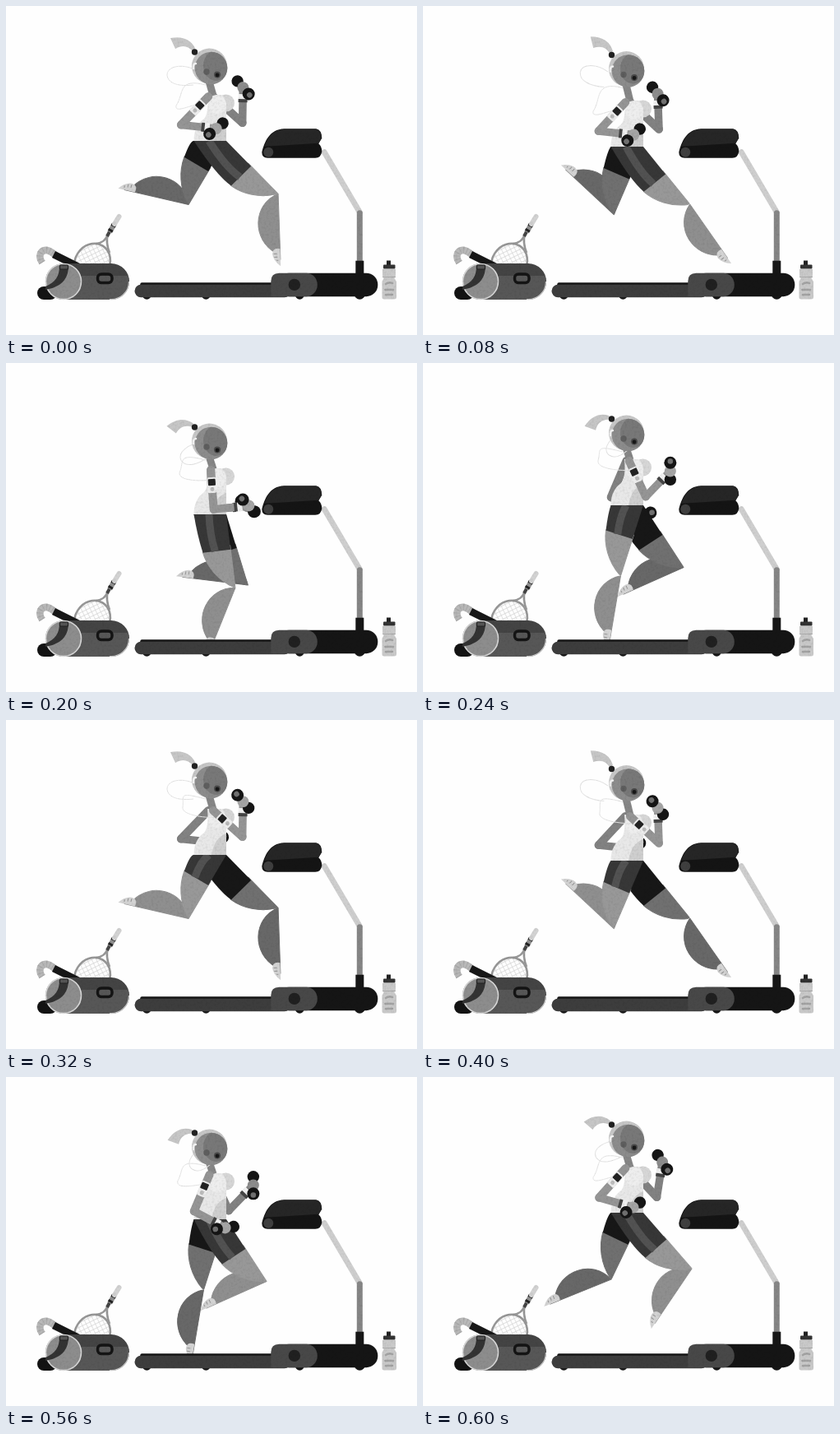
An HTML page for the animation above (0.64 s loop, 500x400 px).

```html
<!DOCTYPE html>
<html lang="en">
<head>
<meta charset="utf-8">
<title>Treadmill run</title>
<style>
  html, body { margin: 0; width: 100%; height: 100%; overflow: hidden; background: #fefefe; }
  svg { display: block; width: 500px; height: 400px; }
  .line { fill: none; }
  .round { stroke-linecap: round; stroke-linejoin: round; }
</style>
</head>
<body>
<svg viewBox="0 0 500 400">
  <defs>
    <filter id="grain" filterUnits="userSpaceOnUse" x="0" y="0" width="500" height="400" color-interpolation-filters="sRGB">
      <feTurbulence type="fractalNoise" baseFrequency=".35" numOctaves="3" seed="4"/>
      <feColorMatrix values="1.6 0 0 0 .1  1.6 0 0 0 .1  1.6 0 0 0 .1  0 0 0 0 .5" result="noise"/>
      <feComposite in="SourceGraphic" in2="noise" operator="arithmetic" k1=".2" k2=".9"/>
    </filter>
    <clipPath id="face"><circle cx="249.500" cy="2.500" r="19.800"/></clipPath>
    <clipPath id="above-belt"><rect width="500" height="340"/></clipPath>
    <pattern id="mesh" width="5" height="5" patternUnits="userSpaceOnUse" patternTransform="rotate(32)">
      <path d="M0 0H5M0 0V5" stroke="#c9c9c9" stroke-width="1.100"/>
    </pattern>
  </defs>

  <g filter="url(#grain)">
    <g id="bag">
      <!-- racket -->
      <ellipse cx="105" cy="312" rx="21" ry="24" transform="rotate(32 105 312)" fill="url(#mesh)" stroke="#979797" stroke-width="2.600"/>
      <path class="line" d="M109 289Q121 288 124 277M126 300Q121 288 124 277" stroke="#979797" stroke-width="2.600"/>
      <path d="M123 280L131 265" stroke="#444" stroke-width="4"/>
      <path d="M126 275L132 265" stroke="#8d8d8d" stroke-width="6"/>
      <path d="M126.500 274L128 271.500M130 268L131.500 265.500" stroke="#222" stroke-width="6"/>
      <path class="round" d="M132 265L137.500 256" stroke="#d2d2d2" stroke-width="6"/>
      <!-- hooked stick -->
      <path class="line" d="M44 312C38 303 43 296 50 297Q55 298 61 304" stroke="#b9b9b9" stroke-width="8.500"/>
      <path class="line" d="M44 312C38 303 43 296 50 297Q55 298 61 304" stroke="#a8a8a8" stroke-width="8.500" stroke-dasharray="1 3"/>
      <path d="M58 302L88 317" stroke="#171717" stroke-width="9"/>
      <!-- duffel -->
      <rect x="48" y="313" width="102" height="44" rx="22" fill="#444"/>
      <path d="M70 328H148.500A22 22 0 0 1 128 357H70Z" fill="#575757"/>
      <path class="line" d="M126 356.500A21.500 21.500 0 0 0 149.500 335" stroke="#c8c8c8" stroke-width="1.200"/>
      <rect x="111.500" y="326" width="17.500" height="10.500" rx="4.500" fill="none" stroke="#141414" stroke-width="3.500"/>
      <rect x="38" y="341" width="24" height="16" rx="8" fill="#131313"/>
      <circle cx="70" cy="335" r="21.500" fill="#8d8d8d" stroke="#d8d8d8" stroke-width="1.600"/>
      <path d="M65 316H76C76 333 66 342 48 345V341C60 336 65 329 65 316Z" fill="#333"/>
      <rect x="65.500" y="315" width="10" height="5" rx="1" fill="#555" stroke="#222" stroke-width="1.200"/>
    </g>

    <g id="bottle">
      <rect x="463" y="309.500" width="5" height="7" fill="#222"/>
      <rect x="459" y="314.500" width="14.500" height="5" rx="1" fill="#333"/>
      <path d="M458 320H474V328L472.500 331L475 335V354Q475 356.500 472 356.500H460Q457.500 356.500 457.500 354V335L459.500 331L458 328Z" fill="#c9c9c9"/>
      <path d="M458 329.500H474" stroke="#a9a9a9"/>
      <path class="round" d="M462 338Q466 335 470 337M461.500 345H471M462 351H470" fill="none" stroke="#a2a2a2" stroke-width="2.600"/>
    </g>

    <g id="runner">
      <g id="far-arm"></g>
      <g clip-path="url(#above-belt)">
        <g id="far-leg"></g>
        <g id="near-leg"></g>
      </g>
      <g id="torso">
        <circle cx="267.500" cy="-46" r="10.500" fill="#d6d6d6"/>
        <path d="M228.500 0C228.500 -14 234 -22 241 -27Q247 -34 245 -56H262Q268 -52 268 -40V0Z" fill="#e8e8e8"/>
        <path d="M250 0C253 -17 260 -23 268 -26V0Z" fill="#cfcfcf"/>
        <circle cx="257" cy="-44" r="11" fill="#eee"/>
      </g>
      <path id="neck" stroke="#868686" stroke-width="9"/>
      <path id="cord" class="line" stroke="#e4e4e4"/>
      <g id="head">
        <g id="tail">
          <path d="M230 -22C225 -32 215 -37 200 -34L206 -21C214 -26 222 -25 228 -17Z" fill="#c6c6c6"/>
          <path class="line" d="M229 4C214 -3 196 0 196 11C197 22 212 25 228 23" stroke="#e4e4e4"/>
        </g>
        <circle cx="247.500" cy="0" r="21.500" fill="#c6c6c6"/>
        <circle cx="249.500" cy="2.500" r="19.800" fill="#8c8c8c"/>
        <ellipse cx="255.500" cy="-.5" rx="15.500" ry="18.500" fill="#787878" clip-path="url(#face)"/>
        <path class="line round" d="M228 3Q227 -3 231 -3" stroke="#f2f2f2" stroke-width="2.400"/>
        <circle cx="244" cy="7" r="3.700" fill="#5e5e5e"/>
        <circle cx="257" cy="10.500" r="4" fill="#4a4a4a"/>
        <circle cx="257" cy="11" r="2.400" fill="#171717"/>
        <circle cx="229.500" cy="-17" r="3.700" fill="#222"/>
      </g>
      <g id="near-arm"></g>
    </g>

    <g id="treadmill" transform="translate(.3 .7)">
      <path d="M387 177L430 250" stroke="#cfcfcf" stroke-width="7" class="round"/>
      <path d="M430 251V312" stroke="#868686" stroke-width="7" class="round"/>
      <rect x="425" y="309" width="10" height="16" fill="#161616"/>
      <path d="M311 177C314 165 320 149 338 148.500H377Q384 150 384 160L380 166.500Q384 170 384 176Q383 184 376 184H318Q311 184 311 177Z" fill="#141414"/>
      <path d="M314 170C318 159 324 150 338 149H377Q383 151 383.500 160L380 166Q350 168 314 170Z" fill="#262626"/>
      <circle cx="319" cy="177" r="6" fill="#3f3f3f"/>
      <g fill="#161616">
        <circle cx="171" cy="350.500" r="5.500"/><circle cx="243" cy="350.500" r="5.500"/>
        <circle cx="357" cy="350.500" r="5.500"/><circle cx="430" cy="349.500" r="6.500"/>
        <rect x="163" y="335.500" width="170" height="6" rx="2"/>
      </g>
      <rect x="156.200" y="338" width="190" height="15.500" rx="7.700" fill="#3d3d3d"/>
      <rect x="330" y="324" width="122" height="28.500" rx="14" fill="#151515"/>
      <path d="M332 324H365A13.500 14.250 0 0 1 365 352.500H322V334Q322 324 332 324Z" fill="#484848"/>
      <circle cx="350.500" cy="338.200" r="7.200" fill="#202020"/>
    </g>
  </g>
</svg>

<script>
const STEP = 40, LOOP = 640, HIP_X = 268;
const THIGH = 90, UPPER_ARM = 48, FOREARM = 43;

// Limb angles in degrees: 0 hangs down, 90 points forward. One value per step.
const swing = {
  thigh: [44.5, 43, 39, 36, 29.7, 7, -17.8, -25.7, -30.6, -29, -23.4, -14, -.6, 17, 33, 41],
  shin: [2, 22, 35, 8, -28, -22, -9.6, -68, -103, -122, -133, -131, -120, -97, -66, -34],
  arm: [-44, -44, -43, -34, -19, 4, 25, 43, 48, 49, 47, 40, 24, 2, -23, -42],
  forearm: [84, 85, 84, 74, 57, 96, 136, 171, 179, 182, 182, 165, 140, 95, 62, 74],
  bell: [141, 138, 137, 150, 172, 225, 270, 237, 229, 229, 231, 252, 270, 220, 172, 145]
};
// The body bounces twice per loop.
const bounce = {
  waist: [164, 166, 171, 182, 194, 184, 173, 165],
  head: [73, 74, 76.5, 90, 104.5, 95, 85, 75],
  tail: [20, 27, 31, 23, 10, -8, -25, -4]
};

const $ = id => document.getElementById(id);
const set = (id, name, value) => $(id).setAttribute(name, value);

function legMarkup(side, skin, calf, shorts) {
  return `
    <g id="${side}-shin" stroke-linejoin="round">
      <path d="M0 0C12 32 55 34 72 5L80 0Z" fill="${calf}" stroke="${calf}"/>
      <path d="M67 0Q65 9 73 9.500Q81 9 88 0Z" fill="#d3d3d3"/>
      <path d="M73 4V8M77 3.500V7.500M81 2.500V5" stroke="#949494"/>
    </g>
    <path id="${side}-thigh" d="M38 0V33L43 34C60 31 78 20 89 2L89 0Z" fill="${skin}" stroke="${skin}" stroke-linejoin="round"/>
    <path id="${side}-shorts" fill="${shorts}"/>
    <path id="${side}-stripe" class="line" stroke="#525252" stroke-width="9"/>`;
}

function armMarkup(side, skin, hand, band) {
  return `
    <path id="${side}-upper" class="round" stroke="${skin}" stroke-width="10"/>
    <path id="${side}-lower" class="round" stroke="${skin}" stroke-width="9.500"/>
    <g id="${side}-wrist">
      <rect x="25" y="-5.500" width="4" height="11" fill="#444"/>
      <rect x="29" y="-5.500" width="6" height="11" fill="#f1f1f1"/>
    </g>
    ${band}
    <g id="${side}-bell">
      <circle cx="-10.300" r="7.200" fill="#151515"/>
      <circle r="7" fill="${hand}"/>
      <circle cx="10.300" r="7.500" fill="#151515"/>
      <circle cx="12" r="3.300" fill="#707070"/>
    </g>`;
}

const armband = `<g id="band">
  <rect x="9" y="-5.500" width="19" height="11" rx="2" fill="#ededed"/>
  <rect x="11" y="-4.500" width="8" height="9" rx="1" fill="#222"/>
  <circle cx="23.500" r="2.500" fill="#bbb"/></g>`;

$('far-leg').innerHTML = legMarkup('far', '#707070', '#686868', '#171717');
$('near-leg').innerHTML = legMarkup('near', '#989898', '#8f8f8f', '#373737');
$('far-arm').innerHTML = armMarkup('far', '#828282', '#8c8c8c', '');
$('near-arm').innerHTML = armMarkup('near', '#959595', '#a5a5a5', armband);
$('far-stripe').remove();

// Local frame of a limb: u runs along it, v points to its back.
function limb(origin, degrees) {
  const a = degrees * Math.PI / 180, s = Math.sin(a), c = Math.cos(a);
  return {
    at: (u, v = 0) => [origin[0] + u * s - v * c, origin[1] + u * c + v * s],
    matrix: `matrix(${s} ${c} ${-c} ${s} ${origin})`
  };
}

function poseLeg(side, i, waist) {
  const thigh = limb([HIP_X, waist], swing.thigh[i]);
  const shin = limb(thigh.at(THIGH), swing.shin[i]);
  set(side + '-thigh', 'transform', thigh.matrix);
  set(side + '-shin', 'transform', shin.matrix);
  set(side + '-shorts', 'd',
    `M228.500 ${waist}H${HIP_X}L${thigh.at(43)}L${thigh.at(43, 34)}Q${thigh.at(22, 38)} 228.500 ${waist}Z`);
  if (side === 'near')
    set('near-stripe', 'd', `M247 ${waist}Q${thigh.at(22, 23)} ${thigh.at(43, 19)}`);
}

function poseArm(side, i, waist) {
  const twist = 4 * Math.sin(swing.arm[i] * Math.PI / 180);
  const shoulder = [249 + twist, waist - 54];
  const upper = limb(shoulder, swing.arm[i]);
  const elbow = upper.at(UPPER_ARM);
  const lower = limb(elbow, swing.forearm[i]);
  const turn = swing.bell[i] + (side === 'far' ? 180 : 0);
  set(side + '-upper', 'd', `M${shoulder}L${elbow}`);
  set(side + '-lower', 'd', `M${elbow}L${lower.at(FOREARM - 4)}`);
  set(side + '-wrist', 'transform', lower.matrix);
  set(side + '-bell', 'transform', `translate(${lower.at(FOREARM)}) rotate(${turn})`);
  if (side === 'near') set('band', 'transform', upper.matrix);
  return upper;
}

function pose(step) {
  const half = step % 8, opposite = (step + 8) % 16;
  const waist = bounce.waist[half], head = bounce.head[half];
  poseLeg('near', step, waist);
  poseLeg('far', opposite, waist);
  poseArm('far', opposite, waist);
  const upper = poseArm('near', step, waist);

  set('torso', 'transform', `translate(0 ${waist})`);
  set('head', 'transform', `translate(0 ${head})`);
  set('tail', 'transform', `rotate(${bounce.tail[half] - 20} 229.5 -17)`);
  set('neck', 'd', `M246 ${head + 15}L252 ${waist - 55}`);

  // Earphone cord sags between the neck and the armband.
  const plug = upper.at(12), lift = (swing.arm[step] + 44) / 92;
  const x = 207 + 8 * lift, y = waist - 43 - 15 * lift;
  set('cord', 'd', `M243 ${head + 23}C208 ${head + 14} 217 ${y - 14} ${x} ${y}` +
    `C${x - 2} ${y + 10} ${plug[0] - 15} ${plug[1] + 2} ${plug}`);
}

let shown = -1;
function tick() {
  const step = Math.floor((performance.now() - start) % LOOP / STEP);
  if (step !== shown) pose(shown = step);
  requestAnimationFrame(tick);
}
const start = performance.now();
tick();
</script>
</body>
</html>
```
